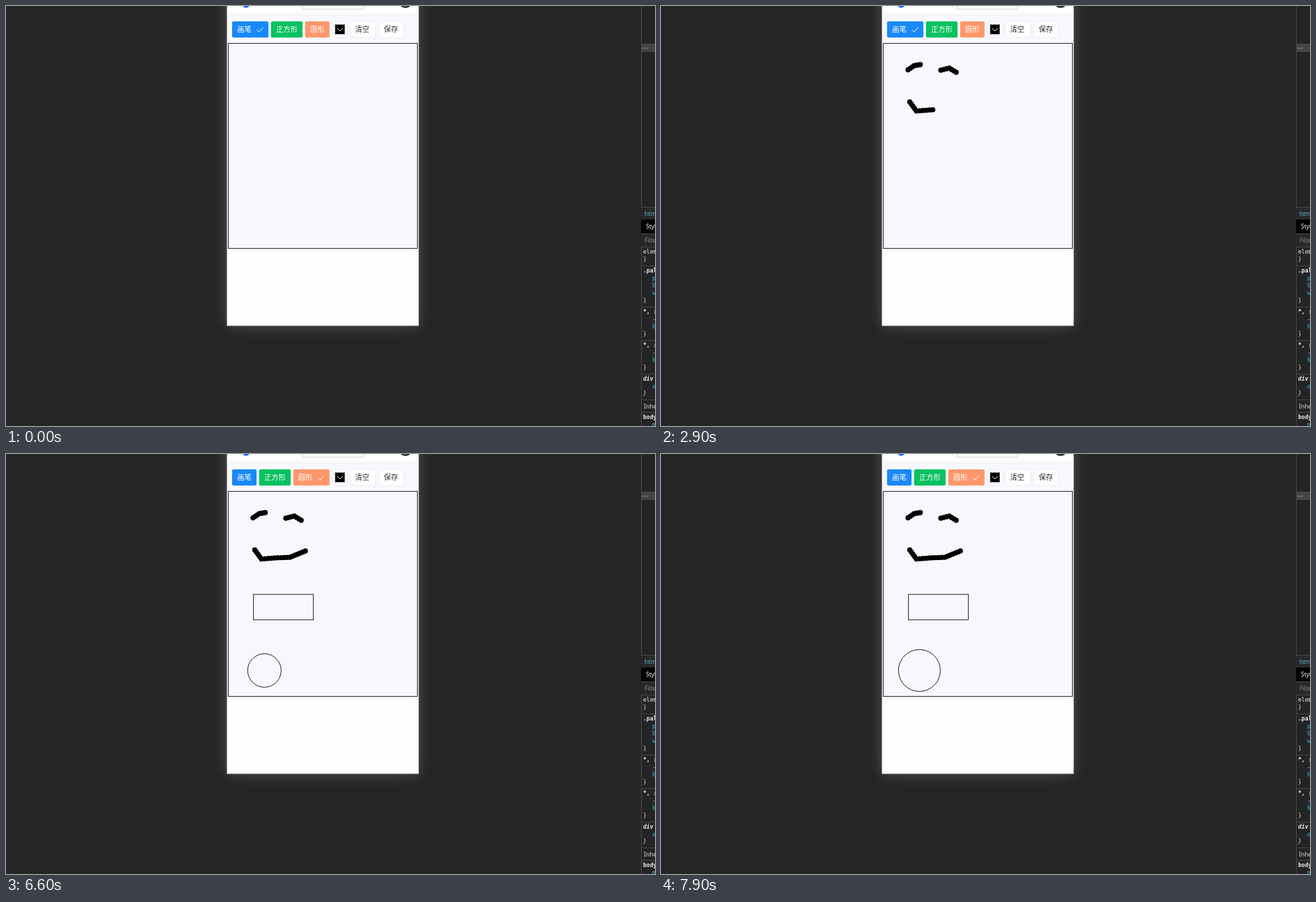
Animation, 930 px wide and 602 px high, one loop 8000 ms. Source, as an HTML page with a canvas:

```html
<!DOCTYPE html>
<html lang="zh">
<head>
<meta charset="utf-8">
<style>
html, body { margin: 0; height: 100%; overflow: hidden; background: #252525; }
canvas { display: block; }
</style>
</head>
<body>
<canvas id="stage" width="930" height="602"></canvas>
<script>
const c = document.getElementById('stage').getContext('2d');
const LOOP = 8000;
const CJK = '10.3px "Noto Sans CJK SC", "Noto Sans CJK", sans-serif';
const SANS = '8.5px "Noto Sans", "Open Sans", sans-serif';
const MONO = '8px "DejaVu Sans Mono", monospace';

// pen strokes: start time, dot spacing, corner points
const strokes = [
  [1100, 3.3, [354, 91.5], [363, 85.5], [371.5, 84]],
  [2000, 3.6, [401, 92], [413, 89], [423, 95]],
  [2800, 4.3, [356.5, 137.5], [366, 150.5], [385, 149], [407, 148], [429, 139]]
].map(([start, gap, ...path]) => ({ start, dots: spread(path, gap) }));

const tools = [['画笔', '#1989fa'], ['正方形', '#07c160'], ['圆形', '#ff976a']];

const rules = [
  ['element.style {'],
  ['.palette {', 'padding', 'background', 'width'],
  ['*, ::before {', '--', 'box-sizing'],
  ['*, ::after {', '--', 'box-sizing'],
  ['div {', 'display']
];

// evenly spaced dots along a polyline
function spread(path, gap) {
  const dots = [path[0]];
  for (let i = 1; i < path.length; i++) {
    const [x, y] = path[i - 1], dx = path[i][0] - x, dy = path[i][1] - y;
    const n = Math.round(Math.hypot(dx, dy) / gap);
    for (let k = 1; k <= n; k++) dots.push([x + dx * k / n, y + dy * k / n]);
  }
  return dots;
}

// share of a drag done, advancing every 100 ms
const step = (t, start, n) => Math.max(0, Math.min(n, Math.floor((t - start) / 100) + 1)) / n;

function rect(x, y, w, h, color) {
  c.fillStyle = color;
  c.fillRect(x, y, w, h);
}

function text(s, x, y, color, font) {
  c.font = font;
  c.fillStyle = color;
  c.fillText(s, x, y);
}

function dot(x, y, r, color) {
  c.fillStyle = color;
  c.beginPath();
  c.arc(x, y, r, 0, 7);
  c.fill();
}

function tick(x, y, a, b, color) {
  c.strokeStyle = color;
  c.beginPath();
  c.moveTo(x - a, y - a);
  c.lineTo(x, y);
  c.lineTo(x + b, y - b);
  c.stroke();
}

function shadowed(blur, color, draw) {
  c.save();
  c.shadowBlur = blur;
  c.shadowColor = color;
  draw();
  c.restore();
}

function clipped(x, y, w, h, draw) {
  c.save();
  c.beginPath();
  c.rect(x, y, w, h);
  c.clip();
  draw();
  c.restore();
}

function button(x, w, label, fill) {
  c.beginPath();
  if (fill) c.roundRect(x, 21.9, w, 23.4, 2);
  else c.roundRect(x + .5, 22.5, w - 1, 22.4, 2);
  c.fillStyle = fill || '#fff';
  c.fill();
  if (!fill) {
    c.strokeStyle = '#ebedf0';
    c.stroke();
  }
  text(label, x + 7.2, 37.4, fill ? '#fff' : '#323233', CJK);
}

function toolbar(active) {
  let x = 324;
  tools.forEach(([label, color], i) => {
    const on = i === active;
    const w = label.length * 10.2 + 14.6 + (on ? 17 : 0);
    button(x, w, label, color);
    if (on) tick(x + w - 13.5, 37, 3, 6.5, '#fff');
    x += w + 3.7;
  });
  button(468, 22, '');
  rect(471, 26, 15, 15, '#999');
  rect(472, 27, 13, 13, '#000');
  tick(478.5, 36, 4, 4, '#fff');
  button(493, 37, '清空');
  button(534, 36, '保存');
}

function ruleBlock([selector, ...props], y) {
  const pitch = 10.7, style = selector.startsWith('div') ? 'italic ' : '';
  const weight = selector.startsWith('element') ? '' : 'bold ';
  let base = y + 10;
  text(selector, 913, base, '#eee', style + weight + MONO);
  props.forEach(p => text(p, 926, base += pitch, p === '--' ? '#ddd' : '#35b4dc', style + MONO));
  text('}', 913, base += pitch, '#ddd', style + MONO);
  return Math.round(base + 5.8);
}

function devtools() {
  const rule = y => rect(910, y, 20, 1, '#484848');
  rect(910, 0, 20, 602, '#242424');
  rect(910, 0, 1, 602, '#484848');
  rect(910, 54, 20, 12, '#454545');
  for (let i = 0; i < 3; i++) dot(912.8 + 3 * i, 60.5, .8, '#aaa');
  rect(910, 289, 20, 56, '#292929');
  rect(910, 306, 20, 20, '#000');
  text('html', 915, 300.5, '#5db0d7', SANS);
  text('Styles', 917, 319, '#fff', SANS);
  text('Filter', 915, 338.5, '#8c8c8c', SANS);
  rule(288);
  rule(326);
  let y = 345;
  for (const block of rules) {
    rule(y);
    y = ruleBlock(block, y);
  }
  rule(y);
  text('Inherited', 914, y + 12.5, '#ddd', SANS);
  rule(y + 18);
  ruleBlock(['body {', 'margin'], y + 18);
}

function drawing(t) {
  for (const { start, dots } of strokes) {
    const n = Math.round(dots.length * step(t, start, 4));
    dots.slice(0, n).forEach(([x, y]) => dot(x, y, 3.7, '#000'));
  }
  c.strokeStyle = '#222';
  const drag = step(t, 4500, 5);
  if (drag) c.strokeRect(354.6, 201.2, 85.8 * drag, 36.5 * drag);
  if (t >= 6600) {
    const r = 24 + 23 * (step(t, 6600, 5) * 5 - 1) / 4 - 17 * step(t, 7300, 7);
    c.beginPath();
    c.arc(370.3, 310.3, r, 0, 7);
    c.stroke();
  }
}

function draw(t) {
  c.lineWidth = 1;
  rect(0, 0, 930, 602, '#252525');
  shadowed(20, 'rgba(255,255,255,.22)', () => rect(316.6, -30, 274.8, 488.4, '#fefefe'));

  clipped(317, 0, 274, 458, () => {
    dot(344, -2.3, 5, '#1677ff');
    c.strokeStyle = '#d5d7dc';
    c.strokeRect(424.5, -10.5, 87, 15);
    dot(572.5, -7, 10, '#333');
    shadowed(6, 'rgba(100,101,102,.16)', () => rect(317, 14, 274, 334, '#f7f8fd'));
  });

  c.strokeStyle = '#222';
  c.strokeRect(318.6, 53.6, 270.9, 293.8);
  toolbar(t < 4000 ? 0 : t < 5800 ? 1 : 2);
  clipped(319, 54, 270, 293, () => drawing(t));
  devtools();
}

function frame(now) {
  draw(now % LOOP);
  requestAnimationFrame(frame);
}
frame(performance.now());
</script>
</body>
</html>
```
